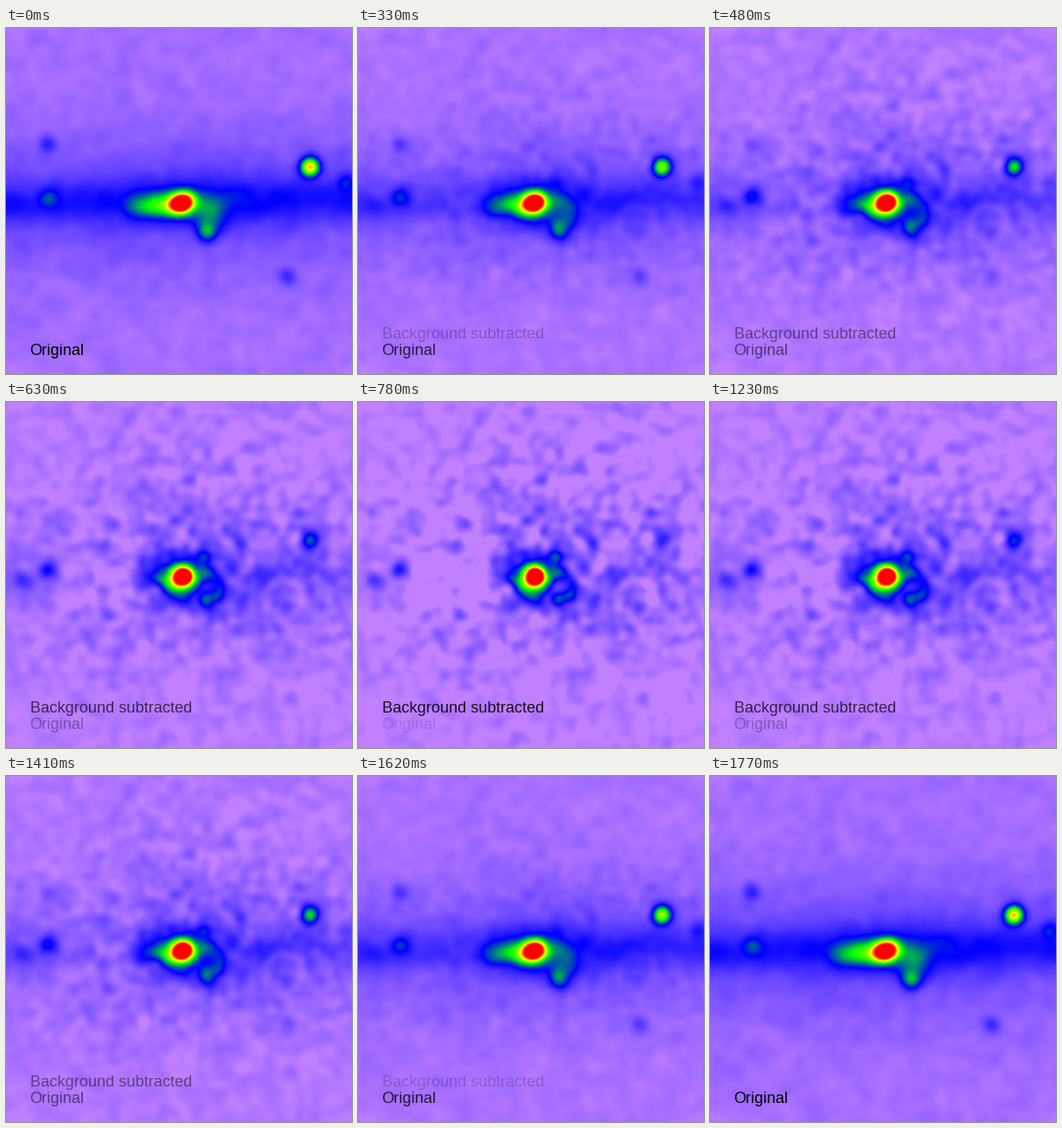
Recreate the animation shown at these times as a matplotlib script. Size 400 by 400 pixels, loop 1800 ms.

```python
import numpy as np
import matplotlib.pyplot as plt
from matplotlib.animation import FuncAnimation
from matplotlib.colors import LinearSegmentedColormap

SIZE, DPI = 400, 100
FRAMES, INTERVAL = 60, 30
FADE_OUT, FADE_OUT_STEPS = 6, 24
FADE_BACK, FADE_BACK_STEPS = 35, 25

# Field units: 0 lilac, 1 blue, 2 green, 3 yellow, 4 red
HEAT = LinearSegmentedColormap.from_list(
    "heat", ["#c080ff", "#0000ff", "#00ff00", "#ffff00", "#ff0000"], N=2048)

CORE, SHELL, STAR = (204, 202), (234, 213), (351, 160)
FAINT_SOURCES = [(47, 133), (325, 287), (392, 177), (49, 196)]
KNOTS = [(18, 203), (49, 192), (97, 203), (247, 221), (228, 186)]

Y, X = np.mgrid[0:SIZE, 0:SIZE].astype(float)


def blob(center, sx, sy=None, tilt=0):
    """Unit Gaussian, rotated counter-clockwise on screen by tilt."""
    dx, dy = X - center[0], Y - center[1]
    c, s = np.cos(tilt), np.sin(tilt)
    along, across = c * dx - s * dy, s * dx + c * dy
    return np.exp(-(along / sx) ** 2 / 2 - (across / (sy or sx)) ** 2 / 2)


def smooth_noise(seed, sigma):
    white = np.random.default_rng(seed).normal(size=(SIZE, SIZE))
    f = np.fft.fftfreq(SIZE)
    kernel = np.exp(-2 * (np.pi * sigma) ** 2 * (f[:, None] ** 2 + f ** 2))
    noise = np.fft.ifft2(np.fft.fft2(white) * kernel).real
    return noise / noise.std()


def sky_map():
    dy = Y - (202 - 5 * X / SIZE)
    field = 0.14 + 0.28 * np.exp(-(dy / 60) ** 2 / 2)
    field += 0.46 * np.exp(-(dy / 17) ** 2 / 2)
    field += 0.2 * blob((230, 200), 75, 32)
    field += 4.0 * blob((203, 202), 9.5, 7.3, tilt=0.3)
    for t in np.linspace(0, 1, 5):  # tail fading to the left
        field += (0.85 - 0.4 * t) * blob((203 - 52 * t, 202 + 5 * t), 10)
    field += 0.75 * blob(SHELL, 13) + 1.1 * blob((232, 235), 8)
    field += 2.85 * blob(STAR, 7.3)
    field += sum(0.5 * blob(p, 7) for p in FAINT_SOURCES)
    return field + 0.03 * smooth_noise(4, 6)


def residual_map():
    grain = 0.05 + 0.16 * blob((235, 180), 130, 105)
    field = grain * smooth_noise(11, 5) + 0.28 * blob((245, 192), 85, 65)
    field += 0.5 * blob(CORE, 25) + 1.5 * blob((201, 203), 14, 12)
    field += 4.2 * blob((205, 201.5), 7.5, tilt=0.3)
    field += 0.45 * blob((183, 202), 8)
    field -= 0.75 * blob((120, 208), 30, 22)
    ring = np.hypot(X - SHELL[0], Y - SHELL[1])
    field += 0.35 * np.exp(-((ring - 14) / 5) ** 2 / 2)
    field -= 0.5 * blob(SHELL, 7)
    field += 0.3 * blob(STAR, 8)
    return field + sum(0.65 * blob(p, 7) for p in KNOTS)


def blend_amount(i):
    """Share of the background-subtracted view at tick i."""
    if i < FADE_BACK:
        return np.clip((i - FADE_OUT + 1) / FADE_OUT_STEPS, 0, 1)
    return np.clip(1 - (i - FADE_BACK + 1) / FADE_BACK_STEPS, 0, 1)


sky, residual = sky_map(), residual_map()

fig = plt.figure(figsize=(SIZE / DPI, SIZE / DPI), dpi=DPI)
ax = fig.add_axes([0, 0, 1, 1])
ax.axis("off")
image = ax.imshow(sky, cmap=HEAT, vmin=0, vmax=4, interpolation="nearest",
                  aspect="auto")


def caption(text, baseline):
    return ax.text(27, baseline, text, family="Liberation Sans", fontsize=13.15,
                   color="black", va="baseline")


subtracted_label = caption("Background subtracted", 358.5)
original_label = caption("Original", 377.5)


def update(i):
    a = blend_amount(i)
    image.set_data((1 - a) * sky + a * residual)
    subtracted_label.set_alpha(a)
    original_label.set_alpha(1 - a)
    return image, subtracted_label, original_label


anim = FuncAnimation(fig, update, frames=FRAMES, interval=INTERVAL,
                     repeat=True, blit=False)
plt.show()
```
